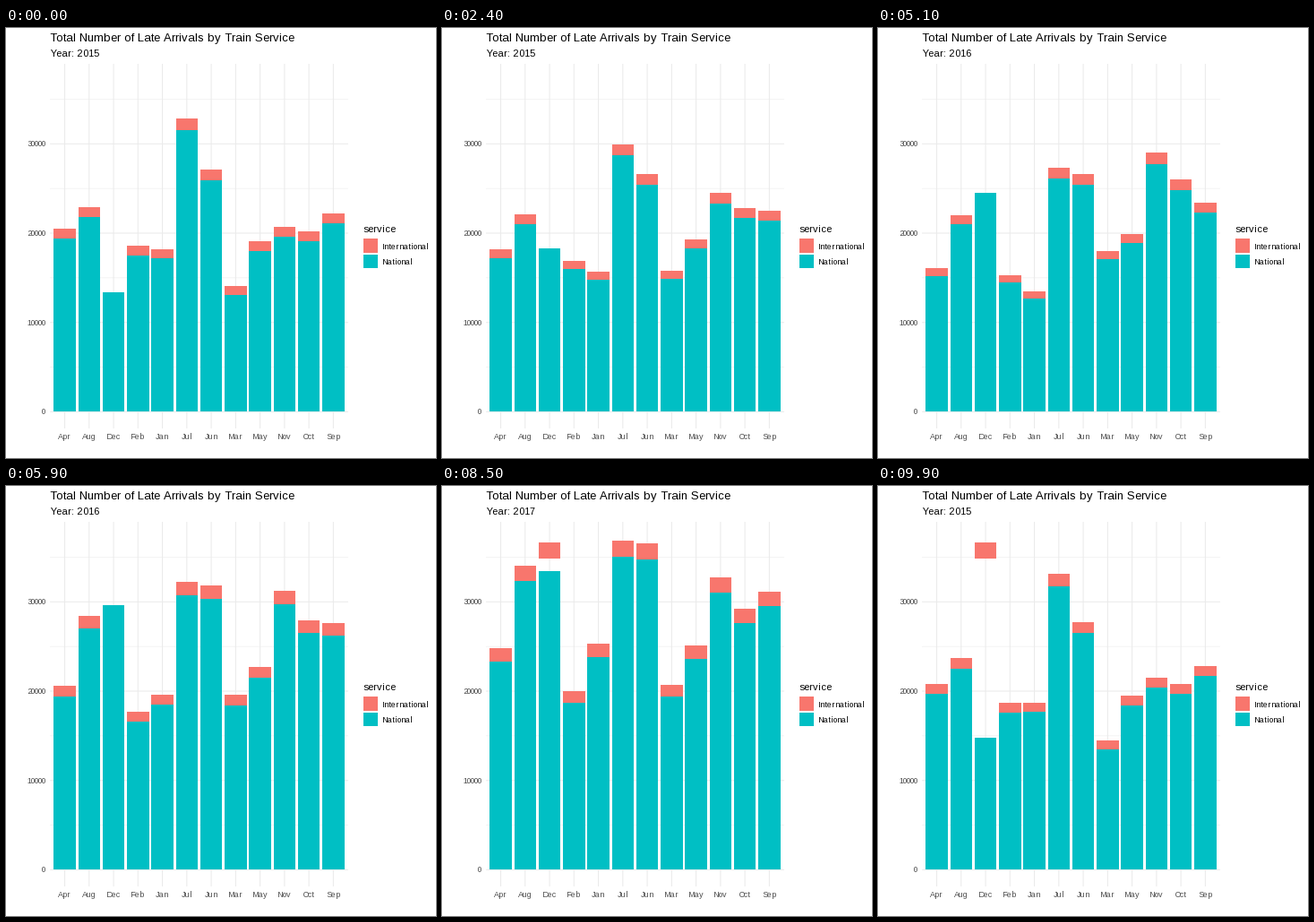
A matplotlib script for the animation above (10 s loop, 480 by 480 pixels).

```python
import numpy as np
import matplotlib.pyplot as plt
from matplotlib.animation import FuncAnimation
from matplotlib.patches import Rectangle

SIZE, DPI = 480, 100
PT = 72 / DPI  # points per pixel
FRAMES, STEP_MS = 100, 100
HOLD, MOVE = 16, 17  # steps a year rests, steps to the next one

CORAL, TEAL = "#F8766D", "#00BFC4"
GRID, GREY = "#EBEBEB", "#4D4D4D"

LEFT, RIGHT, TOP, BOTTOM = 49.15, 381.9, 40, 447
ZERO, PER_1K = 428.4, 9.97
FIRST, PITCH = 65.53, 27.26
WIDTH = 0.9 * PITCH

# Late national trains in thousands, January to December
MONTHS = "Jan Feb Mar Apr May Jun Jul Aug Sep Oct Nov Dec".split()
LATE = {
    2015: [17.2, 17.5, 13.1, 19.4, 18.0, 25.9, 31.5, 21.8, 21.1, 19.1, 19.6, 13.4],
    2016: [12.0, 14.2, 16.9, 14.7, 18.6, 24.8, 25.5, 20.2, 21.8, 24.6, 27.5, 23.9],
    2017: [24.3, 18.8, 19.8, 23.6, 24.0, 35.3, 35.3, 33.0, 30.1, 28.2, 31.8, 34.8],
}
YEARS = list(LATE)
ORDER = np.argsort(MONTHS)  # the axis is alphabetical
NAMES = sorted(MONTHS)
DEC = NAMES.index("Dec")
DEC_FROM = HOLD + 1 + HOLD + MOVE + MOVE  # December's upper part shows up here

# International trains grow in line with the national ones
NATIONAL = np.array(list(LATE.values()))[:, ORDER]
BASE = np.array([[0.7], [0.3], [0.7]])
SHARE = np.array([[0.02], [0.035], [0.032]])
TOTAL = NATIONAL + BASE + SHARE * NATIONAL

plt.rcParams["font.family"] = "Liberation Sans"
plt.rcParams["text.hinting_factor"] = 1  # whole-pixel letter advances
fig = plt.figure(figsize=(SIZE / DPI, SIZE / DPI), dpi=DPI, facecolor="white")
ax = fig.add_axes([0, 0, 1, 1])
ax.set_xlim(0, SIZE)
ax.set_ylim(SIZE, 0)
ax.axis("off")


def row(thousands):
    return ZERO - thousands * PER_1K


def line(xs, ys, width):
    ax.plot(xs, ys, color=GRID, lw=width * PT, solid_capstyle="butt",
            snap=False, zorder=1)


def label(x, y, text, size, color="black", ha="left"):
    return ax.text(x, y, text, fontsize=size * PT, color=color, ha=ha,
                   va="baseline", zorder=4)


def box(x, y, w, h, color):
    return ax.add_patch(Rectangle((x, y), w, h, facecolor=color, lw=0,
                                  snap=True, zorder=2))


for k in range(5, 40, 10):
    line([LEFT, RIGHT], [row(k)] * 2, 0.53)
for k in range(0, 40, 10):
    line([LEFT, RIGHT], [row(k)] * 2, 1.07)
    label(44, row(k) + 3, str(k * 1000), 8.8, GREY, "right")

centres = FIRST + PITCH * np.arange(len(NAMES))
for x, name in zip(centres, NAMES):
    line([x, x], [TOP, BOTTOM], 1.07)
    label(x, 459, name, 8.8, GREY, "center")

label(49, 15, "Total Number of Late Arrivals by Train Service", 13.2)
subtitle = label(49, 32, "", 11)

label(398, 228, "service", 11)
for y, name, color in ((235.3, "International", CORAL), (252.6, "National", TEAL)):
    box(398.8, y, 15.9, 15.8, color)
    label(420, y + 11.7, name, 8.8)

lower = [box(x - WIDTH / 2, ZERO, WIDTH, 0, TEAL) for x in centres]
upper = [box(x - WIDTH / 2, ZERO, WIDTH, 0, CORAL) for x in centres]


def span(bar, low, high):
    bar.set_y(row(high))
    bar.set_height(row(low) - row(high))


def draw(i):
    k, step = divmod(i, HOLD + 1 + MOVE)
    following = (k + 1) % len(YEARS)
    start = i - step + HOLD
    p = max(i - start, 0) / min(MOVE, FRAMES - start)

    nat = (1 - p) * NATIONAL[k] + p * NATIONAL[following]
    total = (1 - p) * TOTAL[k] + p * TOTAL[following]
    for m in range(len(NAMES)):
        span(lower[m], 0, nat[m])
        span(upper[m], nat[m], total[m])

    # December has an upper part only in the last year, and it stays put
    span(upper[DEC], NATIONAL[-1, DEC], TOTAL[-1, DEC])
    upper[DEC].set_visible(i >= DEC_FROM)
    subtitle.set_text(f"Year: {YEARS[following if p > 0.55 else k]}")
    return [*lower, *upper, subtitle]


anim = FuncAnimation(fig, draw, frames=FRAMES, interval=STEP_MS, repeat=True,
                     repeat_delay=0, init_func=lambda: draw(0), blit=False)
plt.show()
```
